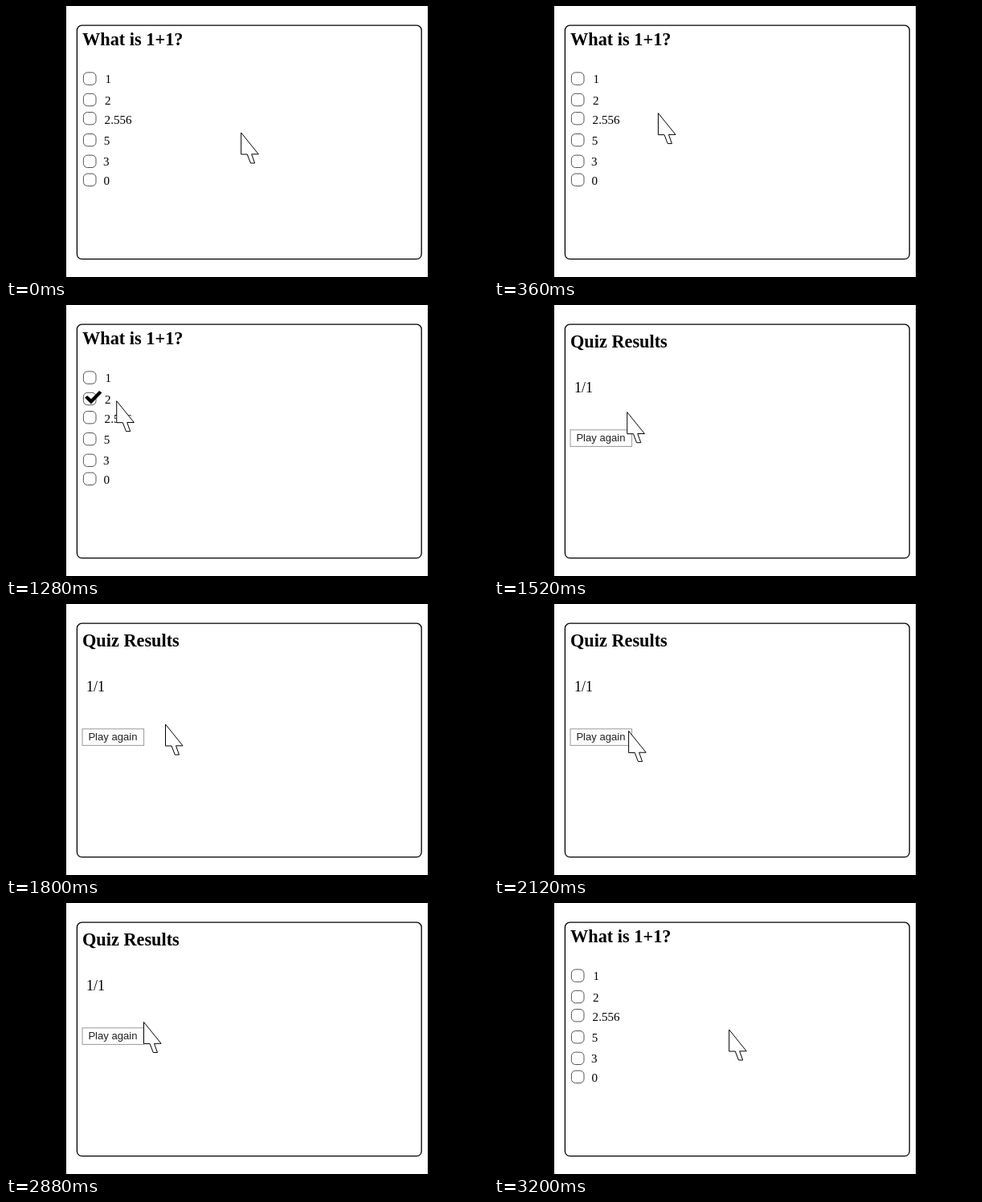
Animation, 600 px wide and 338 px high, one loop 3760 ms. Source, as an HTML page:

```html
<!DOCTYPE html>
<html lang="en">
<head>
<meta charset="utf-8">
<title>Quiz</title>
<style>
  html, body { margin: 0; width: 100%; height: 100%; overflow: hidden; background: #000; }
  svg { display: block; width: 100%; height: 100%; }
  text { font-family: "Liberation Serif", "Times New Roman", serif; }
  .title { font-weight: bold; font-size: 22.3px; }
  .option { font-size: 15.1px; }
  .score { font-size: 18px; }
  .label { font: 13.1px "Liberation Sans", Arial, sans-serif; fill: #222; }
</style>
</head>
<body>
<svg viewBox="0 0 600 338">
  <defs><clipPath id="wipe"><rect id="wipeRect" x="97" y="104" width="0" height="22"/></clipPath></defs>
  <rect width="600" height="338"/>
  <rect x="75" width="450" height="338" fill="#fff"/>
  <rect x="88.4" y="24.2" width="428.8" height="291.4" rx="6" fill="none" stroke="#000" stroke-width="1.3"/>

  <g id="question">
    <text class="title" x="95" y="49">What is 1+1?</text>
    <g id="options"></g>
    <path id="tick" clip-path="url(#wipe)" d="M98 115.4 L101.2 113 L106 117.2 L116 107 L119.4 109.4 L106 123.4 Z"/>
  </g>

  <g id="results">
    <text class="title" x="95" y="53">Quiz Results</text>
    <text class="score" x="100" y="109">1/1</text>
    <rect x="95" y="155.8" width="76.6" height="20.6" fill="#fdfdfd" stroke="#999"/>
    <text class="label" x="102.4" y="170.4">Play again</text>
  </g>

  <path id="cursor" fill="#fff" stroke="#000" d="M0 0 V27 H7.6 L11.8 38 H17 L13 26.8 H21.6 Z"/>
</svg>
<script>
const LOOP = 3760;
const $ = id => document.getElementById(id);

// label, label x, baseline, checkbox centre y
const options = [
  ["1", 123.4, 96, 90.6], ["2", 123, 123, 117], ["2.556", 122.6, 147, 140.2],
  ["5", 121.8, 173, 167.2], ["3", 121, 199.4, 193.8], ["0", 121.6, 223.4, 216.8]
];
$("options").innerHTML = options.map(([label, x, y, cy]) =>
  `<rect x="96.4" y="${cy - 7.7}" width="15.6" height="15.4" rx="5" fill="none" stroke="#555"/>
   <text class="option" x="${x}" y="${y}">${label}</text>`).join("");

// cursor stops: time, x, y
const stops = [
  [35, 292.7, 158], [680, 117.5, 109.6], [1107, 117.5, 109.6], [1800, 198.5, 150],
  [2485, 132.4, 168], [2515, 132.4, 168], [2880, 171.5, 148.5], [3180, 292.7, 158]
];
const clamp = v => Math.min(1, Math.max(0, v));

function cursorAt(t) {
  const i = stops.findIndex(s => s[0] > t);
  if (i <= 0) return stops[i < 0 ? stops.length - 1 : 0].slice(1);
  const [t0, x0, y0] = stops[i - 1], [t1, x1, y1] = stops[i];
  const p = (t - t0) / (t1 - t0);
  return [x0 + (x1 - x0) * p, y0 + (y1 - y0) * p];
}

function render(time) {
  const t = Math.floor(time % LOOP / 40) * 40;
  const showResults = t >= 1360 && t < 2960;
  $("results").style.display = showResults ? "" : "none";
  $("question").style.display = showResults ? "none" : "";
  $("wipeRect").setAttribute("width", t < 2000 ? 24 * clamp((t - 840) / 240) : 0);
  $("cursor").setAttribute("transform", `translate(${cursorAt(t)})`);
}

const start = performance.now();
function tick() {
  render(performance.now() - start);
  requestAnimationFrame(tick);
}
tick();
</script>
</body>
</html>
```
